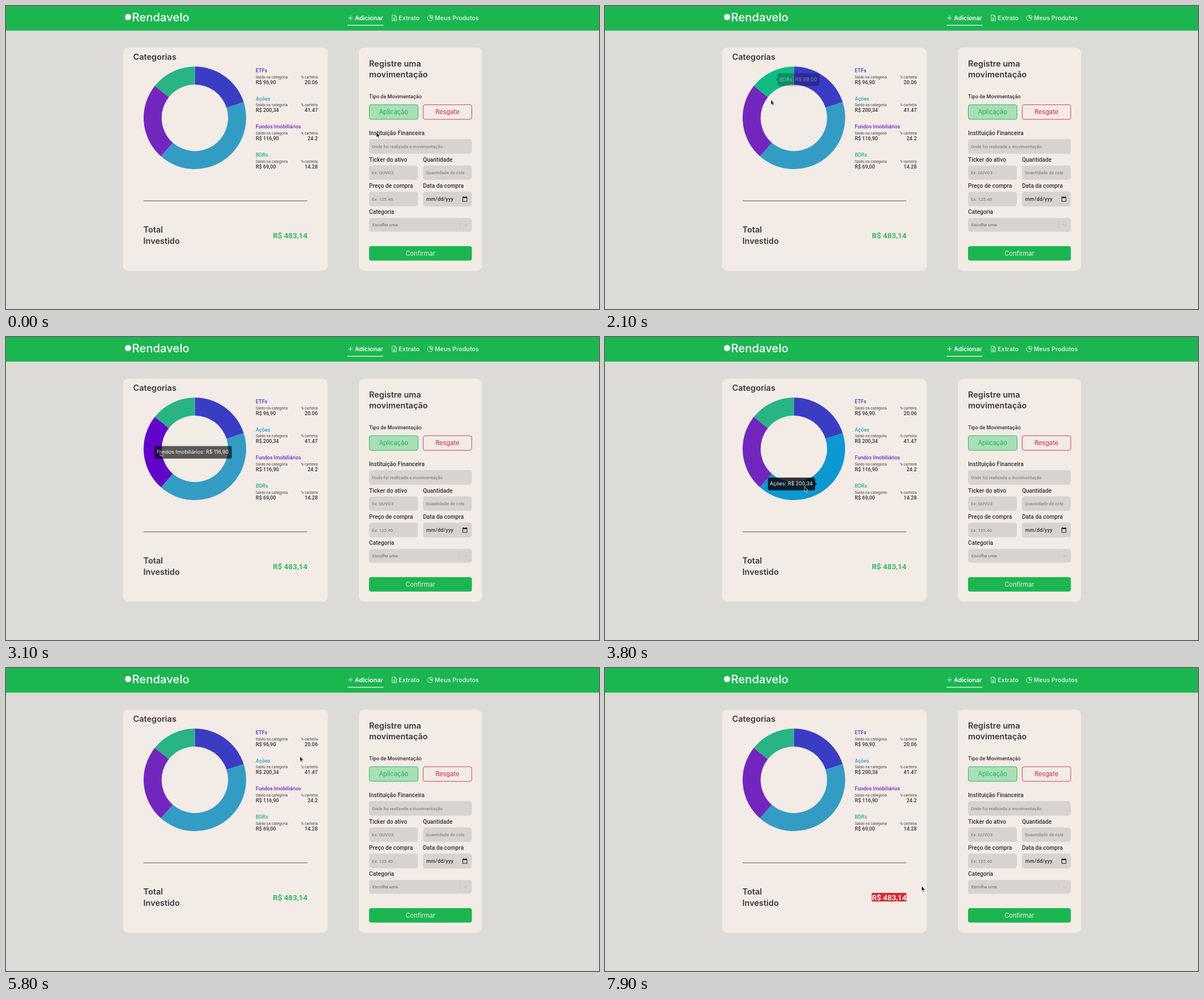
Write an HTML page that moves like this. It is 1047 by 535 pixels and loops after 8 s.

```html
<!DOCTYPE html>
<html lang="pt-BR">
<head>
<meta charset="utf-8">
<title>Carteira</title>
<style>
  html, body { margin: 0; width: 100%; height: 100%; overflow: hidden; background: #dcdbd7; }
  svg { display: block; width: 100%; height: 100%; }
  text { font-family: Roboto, sans-serif; font-weight: 500; font-size: 9.05px; fill: #363132; white-space: pre; }
  .geo { font-family: Inter, sans-serif; }
  .title { font-size: 14.5px; font-weight: 600; fill: #3c3838; }
  .brand { font-size: 20.3px; fill: #fff; }
  .nav { font-size: 10.7px; font-weight: 600; fill: #d6f1de; }
  .nav.on { fill: #fff; }
  .btn { font-size: 11.1px; font-weight: 400; text-anchor: middle; }
  .label { font-size: 10.18px; }
  .hint { font-size: 7.92px; fill: #8b8684; }
  .small { font-size: 6.8px; font-weight: 400; fill: #4a4545; }
  .end { text-anchor: end; }
  .total { font-size: 13.57px; text-anchor: end; fill: #1bb650; }
  .total.picked { fill: #fff; }
  .tip { font-size: 8.95px; font-weight: 400; fill: #fff; }
  .card { fill: #f2ebe6; }
  .field { fill: #d9d3cf; }
  .green { fill: #1bb650; }
  .icon { fill: none; stroke: #d6f1de; stroke-width: .9; }
</style>
</head>
<body>
<svg viewBox="0 0 1047 535" preserveAspectRatio="none">
  <defs>
    <clipPath id="qtyClip"><rect x="737" y="282" width="72" height="26"/></clipPath>
    <clipPath id="dateClip"><rect x="737" y="328" width="53" height="26"/></clipPath>
    <clipPath id="pickClip"><rect id="pickArea" x="471" y="397" width="0" height="15.5"/></clipPath>
  </defs>
  <rect width="1047" height="535" fill="#dcdbd7"/>

  <rect class="green" width="1047" height="43.5"/>
  <circle cx="215.5" cy="19.5" r="5.5" fill="#fff"/>
  <text class="geo brand" x="222.5" y="26.7">Rendavelo</text>
  <path class="icon" style="stroke:#fff" d="M604 21h8.4M608.2 16.8v8.4"/>
  <text class="geo nav on" x="616" y="25">Adicionar</text>
  <rect x="603" y="33.4" width="63.3" height="1.2" fill="#fff"/>
  <path class="icon" d="M681.8 16h5l2.7 2.7v7.4h-7.7zM686.6 16v2.9h2.9M683.5 21h4.3M683.5 22.8h4.3M683.5 24.5h4.3"/>
  <text class="geo nav" x="693.3" y="25">Extrato</text>
  <path class="icon" d="M748.6 16.6a4.7 4.7 0 1 0 4.9 4.9h-4.9zM750 16v4.1h4.1A4.1 4.1 0 0 0 750 16z"/>
  <text class="geo nav" x="757" y="25">Meus Produtos</text>

  <rect class="card" x="206.5" y="73.5" width="361.7" height="394" rx="9"/>
  <text class="geo title" x="224.5" y="95.3">Categorias</text>
  <g id="ring"></g>
  <g id="legend"></g>
  <rect x="242.7" y="343.5" width="289.5" height="1" fill="#5b5654"/>
  <text class="geo title" x="242.5" y="400.2">Total</text>
  <text class="geo title" x="242.5" y="419.9">Investido</text>
  <text class="total" x="532.3" y="409.5">R$ 483,14</text>
  <g clip-path="url(#pickClip)">
    <rect x="471" y="397" width="61.3" height="15.5" fill="#cb3335"/>
    <text class="total picked" x="532.3" y="409.5">R$ 483,14</text>
  </g>

  <rect class="card" x="623" y="73.5" width="217.5" height="394" rx="9"/>
  <text class="geo title" x="641" y="106.7">Registre uma</text>
  <text class="geo title" x="641" y="126.4">movimentação</text>
  <text x="641" y="162.6">Tipo de Movimentação</text>
  <rect x="641.5" y="174.3" width="86" height="25.8" rx="3.4" fill="#a9deb9" stroke="#1bb650" stroke-width=".9"/>
  <text class="geo btn" x="684.3" y="191.2" fill="#1bb650" style="fill:#1bb650">Aplicação</text>
  <rect x="736.6" y="174.3" width="85.7" height="25.8" rx="3.4" fill="none" stroke="#d0294f" stroke-width=".9"/>
  <text class="geo btn" x="779.3" y="191.2" style="fill:#d0294f">Resgate</text>

  <text class="label" x="641" y="228.3">Instituição Financeira</text>
  <rect class="field" x="641" y="235" width="181.5" height="25.7" rx="4.5"/>
  <text class="hint" x="646" y="250.8">Onde foi realizada a movimentação</text>

  <text class="label" x="641" y="274.7">Ticker do ativo</text>
  <rect class="field" x="641" y="281.4" width="86.2" height="25.7" rx="4.5"/>
  <text class="hint" x="646" y="297.2">Ex: QUVO3</text>
  <text class="label" x="736.2" y="274.7">Quantidade</text>
  <rect class="field" x="736.2" y="281.4" width="86.2" height="25.7" rx="4.5"/>
  <text class="hint" x="741.3" y="297.2" clip-path="url(#qtyClip)">Quantidade de cotas</text>

  <text class="label" x="641" y="321">Preço de compra</text>
  <rect class="field" x="641" y="327.8" width="86.2" height="25.7" rx="4.5"/>
  <text class="hint" x="646" y="343.6">Ex: 125.40</text>
  <text class="label" x="736.2" y="321">Data da compra</text>
  <rect class="field" x="736.2" y="327.8" width="86.2" height="26.2" rx="4.5"/>
  <text x="742" y="344.3" clip-path="url(#dateClip)" style="letter-spacing:.2px">mm/dd/yyyy</text>
  <path fill="#1c1a1a" fill-rule="evenodd" d="M806 337h1.3v-1h1.2v1h3.4v-1h1.2v1h1.3v8.6H806zM807 339.3v5.3h6.5v-5.3z"/>

  <text class="label" x="641" y="367.4">Categoria</text>
  <rect class="field" x="641" y="374.2" width="181.5" height="24.4" rx="4.5"/>
  <text class="hint" x="646.7" y="389.4" style="fill:#807c7b">Escolha uma</text>
  <path d="M801.2 379v15" stroke="#cbc7c5" stroke-width=".7"/>
  <path d="M808.7 385.2l3.1 3 3.1-3" fill="none" stroke="#c4c0be" stroke-width="1.1"/>

  <rect class="green" x="641" y="424" width="181.5" height="25.6" rx="4"/>
  <text class="geo btn" x="731.7" y="440.9" style="fill:#f2ebe6">Confirmar</text>

  <g id="tip">
    <path id="tipBox" fill="#000" fill-opacity=".8"/>
    <text id="tipText" class="geo tip"></text>
  </g>
  <path id="cursor" d="M0 0V9.1L2.1 7.2 3.6 10.6 5 10 3.5 6.7H6.3Z" fill="#111" stroke="#fff" stroke-width=".65"/>
</svg>
<script>
const LOOP = 8000, STEP = 100, FADE = 400;
const CX = 333.5, CY = 197.5, OUTER = 90.5, INNER = 58.7;
const $ = id => document.getElementById(id);

const slices = [
  { name: 'ETFs', value: '96,90', share: 20.06, color: [58, 60, 196], hot: [20, 16, 208], tipW: 69, left: true },
  { name: 'Ações', value: '200,34', share: 41.47, color: [51, 156, 197], hot: [12, 152, 209], tipW: 83, left: true },
  { name: 'Fundos Imobiliários', value: '116,90', share: 24.2, color: [115, 38, 190], hot: [98, 3, 199], tipW: 136 },
  { name: 'BDRs', value: '69,00', share: 14.28, color: [40, 180, 132], hot: [16, 188, 132], tipW: 74 }
];

// [time, slice]; -1 means none
const hovers = [[1100, 0], [1500, 3], [2500, 2], [3300, -1], [3500, 1], [4600, -1]];
const tips = [[1100, 0], [1500, 3], [2000, -1], [2500, 2], [2900, -1], [3000, 2], [3300, -1], [3500, 1], [4600, -1]];

// [time, x, y]
const path = [
  [0, 654, 223], [400, 597, 226], [500, 597, 226], [600, 492, 134], [1000, 492, 134],
  [1100, 392, 142], [1400, 335, 124], [1500, 325, 122], [1900, 288, 146], [2000, 296, 160],
  [2400, 284, 182], [2500, 272, 190], [2600, 273, 196], [2800, 274, 198], [2900, 276, 200],
  [3000, 272, 200], [3100, 272, 201], [3300, 290, 216], [3500, 335, 258], [3800, 352, 264],
  [4100, 352, 264], [4200, 360, 267], [4300, 360, 267], [4600, 417, 240], [5000, 446, 156],
  [5200, 461, 195], [5300, 461, 195], [5400, 470, 210], [5800, 519, 156], [6000, 532, 137],
  [6200, 541, 168], [6700, 481, 395], [6800, 481, 395], [7000, 466, 403], [7100, 466, 403],
  [7600, 535, 409], [7900, 559, 385], [8000, 559, 385]
];

const mix = (a, b, p) => a + (b - a) * p;
const easeOut = t => 1 - (1 - Math.min(1, t)) ** 4;
const polar = (turn, r) => [CX + r * Math.sin(turn * 2 * Math.PI), CY - r * Math.cos(turn * 2 * Math.PI)];

function addPath(d) {
  const el = document.createElementNS('http://www.w3.org/2000/svg', 'path');
  el.setAttribute('d', d);
  $('ring').append(el);
  return el;
}

function build() {
  const sum = slices.reduce((s, c) => s + c.share, 0);
  let turn = 0, legend = '';
  slices.forEach((s, i) => {
    const next = turn + s.share / sum;
    const big = next - turn > .5 ? 1 : 0;
    s.el = addPath(`M${polar(turn, OUTER)}A${OUTER} ${OUTER} 0 ${big} 1 ${polar(next, OUTER)}` +
      `L${polar(next, INNER)}A${INNER} ${INNER} 0 ${big} 0 ${polar(turn, INNER)}Z`);
    const [x, y] = polar((turn + next) / 2, (OUTER + INNER) / 2);
    s.tip = { x: s.left ? x - 3.5 - s.tipW : x + 3.5, y: y - 11.5, w: s.tipW, o: 1 };
    turn = next;
    const dy = i * 49.85;
    legend += `<text x="441" y="${116.7 + dy}" style="fill:rgb(${s.color})">${s.name}</text>
      <text class="small" x="441" y="${127.5 + dy}">Saldo na categoria</text>
      <text class="small end" x="550.4" y="${127.5 + dy}">% carteira</text>
      <text x="441" y="${137.5 + dy}">R$ ${s.value}</text>
      <text class="end" x="550.4" y="${137.5 + dy}">${s.share}</text>`;
  });
  $('legend').innerHTML = legend;
}

function drawRing(t) {
  const now = hovers.findLastIndex(h => h[0] <= t);
  slices.forEach((s, i) => {
    let heat = 0;
    if (now >= 0) {
      const [start, active] = hovers[now], dt = (t - start) / FADE;
      if (active === i) heat = easeOut(dt);
      else if (now > 0 && hovers[now - 1][1] === i) heat = Math.max(0, 1 - dt);
    }
    s.el.setAttribute('fill', `rgb(${s.color.map((c, k) => Math.round(mix(c, s.hot[k], heat)))})`);
  });
}

function tipAt(t) {
  let from = { ...slices[0].tip, o: 0 }, shown = 0;
  tips.forEach(([start, id], i) => {
    if (start > t) return;
    const until = i + 1 < tips.length ? Math.min(t, tips[i + 1][0]) : t;
    const p = easeOut((until - start) / FADE);
    const goal = id < 0 ? { ...from, o: 0 } : slices[id].tip;
    if (id >= 0) shown = id;
    from = Object.fromEntries(Object.keys(goal).map(k => [k, mix(from[k], goal[k], p)]));
  });
  return { ...from, slice: slices[shown] };
}

function drawTip(t) {
  const { x, y, w, o, slice } = tipAt(t);
  const edge = slice.left ? x + w : x, dx = slice.left ? 3 : -3;
  $('tip').setAttribute('opacity', o);
  $('tipBox').setAttribute('d', `M${x + 3} ${y}h${w - 6}q3 0 3 3v16.4q0 3-3 3h${6 - w}q-3 0-3-3v-16.4q0-3 3-3z` +
    `M${edge} ${y + 8.2}l${dx} 3l${-dx} 3z`);
  $('tipText').textContent = `${slice.name}: R$ ${slice.value}`;
  $('tipText').setAttribute('x', x + 3.3);
  $('tipText').setAttribute('y', y + 14);
}

function cursorAt(t) {
  const i = path.findLastIndex(k => k[0] <= t);
  const a = path[i], b = path[i + 1] || a;
  const p = b === a ? 0 : (t - a[0]) / (b[0] - a[0]);
  return [mix(a[1], b[1], p), mix(a[2], b[2], p)];
}

function frame(now) {
  const t = Math.floor((now % LOOP) / STEP) * STEP;
  const [x, y] = cursorAt(t);
  drawRing(t);
  drawTip(t);
  $('cursor').setAttribute('transform', `translate(${x} ${y})`);
  const letter = 61.3 / 9;
  const picked = t < 7200 ? 0 : Math.max(0, Math.min(9, Math.round((x - 471) / letter)));
  $('pickArea').setAttribute('width', picked * letter);
  requestAnimationFrame(() => frame(performance.now()));
}

build();
frame(performance.now());
</script>
</body>
</html>
```
